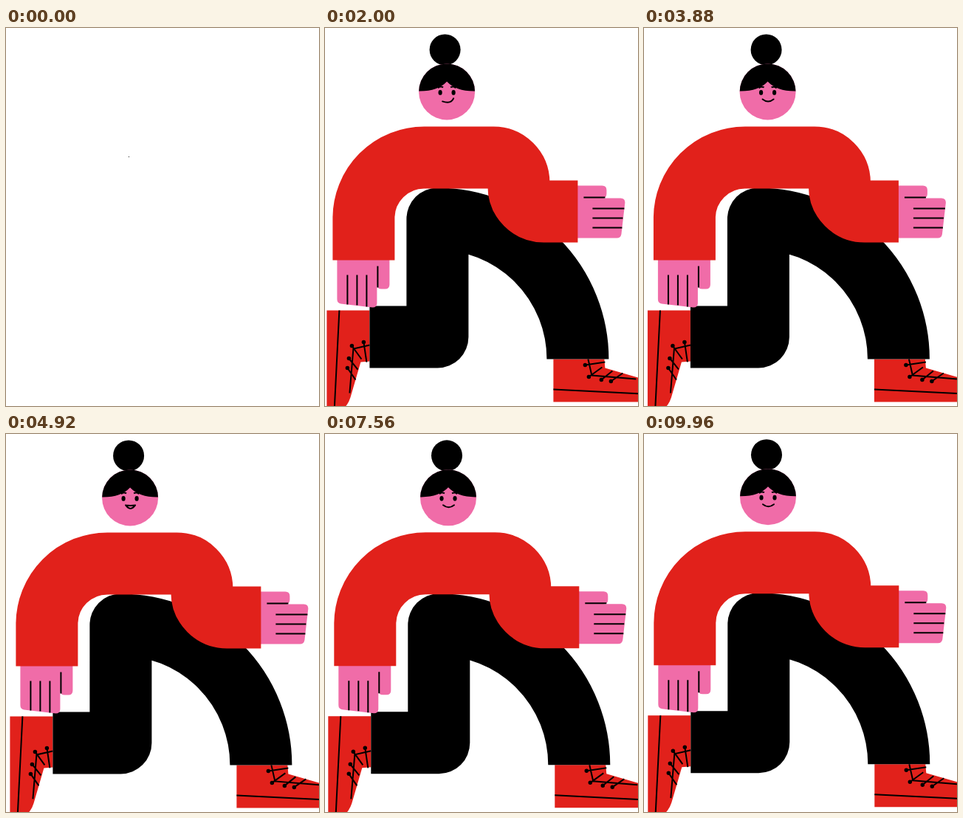
Animation of 424 by 512 pixels, one loop 10000 ms. Source, as an HTML page:

```html
<!DOCTYPE html>
<html lang="en">
<head>
<meta charset="utf-8">
<style>
  html, body { margin: 0; width: 100%; height: 100%; overflow: hidden; background: #fff; }
  svg { display: block; width: 424px; height: 512px; }
  .limb { fill: none; stroke-width: 84; stroke-linejoin: round; }
  .ink { fill: none; stroke: #000; stroke-width: 2; }
</style>
</head>
<body>
<svg viewBox="0 0 424 512">
  <defs>
    <g id="shoe">
      <path fill="#e1211b" d="M0 0H69L70 12L118 26Q140 33 140 58H0Z"/>
      <path class="ink" d="M0 41L140 48M47 0L52 22L112 27M43 8L70 4M48 24L66 11M65 28L80 16M78 30L94 19"/>
      <path stroke="#000" stroke-width="5.5" stroke-linecap="round" d="M43 8h0M48 24h0M65 28h0M78 30h0"/>
    </g>
    <g id="hand">
      <path fill="#f06ca8" d="M-8 0H33Q39 0 39 6V11Q39 17 33 17H58Q64 17 64 23L59 66Q58 71 53 71H-8Z"/>
      <path class="ink" d="M8 16H37M20 31H63M20 44H61M20 57H60"/>
    </g>
    <clipPath id="face"><circle r="38"/></clipPath>
  </defs>
  <circle id="seed" cx="166.5" cy="174.5" r=".6"/>
  <g id="figure">
    <g id="head">
      <circle id="bun" cx="-2" cy="-57" r="21"/>
      <circle r="38" fill="#f06ca8"/>
      <path clip-path="url(#face)" d="M-40 -40H40V-1Q13 0 0 -14Q-13 0 -40 -1Z"/>
      <path class="ink" stroke-width="1.5" d="M-12 -5Q-9 -8 -5 -6M5 -6Q9 -8 12 -5"/>
      <ellipse cx="-9" cy="1" rx="2.6" ry="3.4"/>
      <ellipse cx="9" cy="1" rx="2.6" ry="3.4"/>
      <path id="mouth" class="ink" stroke-linecap="round" stroke-linejoin="round"/>
    </g>
    <use id="backShoe" href="#shoe"/>
    <use id="frontShoe" href="#shoe"/>
    <path id="legs" class="limb" stroke="#000" d="M344 449A190 190 0 0 0 154 259V419H62"/>
    <use id="leftHand" href="#hand"/>
    <use id="rightHand" href="#hand"/>
    <path id="torso" class="limb" stroke="#e1211b"
      d="M54 315V258A82 82 0 0 1 136 176H230A34 34 0 0 1 264 210V215A34 34 0 0 0 298 249H344"/>
  </g>
</svg>
<script>
const LOOP = 10000;
const el = id => document.getElementById(id);
const clamp = v => Math.min(1, Math.max(0, v));
const smooth = v => v * v * (3 - 2 * v);
const span = (t, from, to) => clamp((t - from) / (to - from));
const easeOut = v => 1 - (1 - v) ** 3;
const mix = (a, b, k) => a + (b - a) * k;
const place = (id, transform) => el(id).setAttribute('transform', transform);

// Body drift: time, x, y
const drift = [
  [0, 1, -1], [1160, 0, -1], [1700, -1.6, -.6], [2200, -1.6, -.4], [3000, 0, 0],
  [4100, 1, -.6], [4920, 1.4, -.6], [5900, -.4, -.2], [6480, -.7, -1],
  [7320, 0, -.7], [8640, 3.4, -.5], [9000, 3.6, -.5], [9960, 1.3, -1.8], [LOOP, 1.2, -1.8]
];

// Mouth: time, left x, left y, right x, right y, lower lip, upper lip
const mouths = [
  [0, -6, 13, 9, 9, 17, 17], [3300, -6, 13, 9, 9, 17, 17],
  [3600, -7, 10, 8, 10, 16, 16], [4300, -7, 10, 8, 10, 16, 16],
  [4600, -6, 10, 7, 10, 19, 11], [5300, -6, 10, 7, 10, 19, 11],
  [5600, -7, 10, 8, 10, 16, 16], [LOOP, -7, 10, 8, 10, 16, 16]
];

function sample(keys, t) {
  const i = keys.findIndex(k => k[0] > t);
  const a = keys[i - 1], b = keys[i];
  const k = smooth(span(t, a[0], b[0]));
  return a.slice(1).map((v, j) => mix(v, b[j + 1], k));
}

// Reveals a stroke outwards from its middle
function trim(id, k) {
  const path = el(id), length = path.getTotalLength(), shown = length * k;
  path.style.visibility = k > 0 ? 'visible' : 'hidden';
  path.style.strokeDasharray = k < 1 ? `0 ${(length - shown) / 2} ${shown} ${length}` : 'none';
}

// Settles at 1 after a small overshoot
function pop(t, start) {
  if (t <= start) return 0;
  const s = (t - start) / 1000;
  return 1 - Math.exp(-7 * s) * Math.cos(8 * s);
}

function render(t) {
  el('seed').style.display = t < 40 ? '' : 'none';
  el('figure').style.display = t < 40 ? 'none' : '';
  const [dx, dy] = sample(drift, t);
  place('figure', `translate(${dx} ${dy})`);

  trim('torso', easeOut(span(t, 0, 720)));
  trim('legs', easeOut(span(t, 120, 840)));

  const reach = pop(t, 780), step = pop(t, 560);
  const out = -72 * (1 - reach);
  for (const id of ['leftHand', 'rightHand'])
    el(id).style.visibility = t > 780 ? 'visible' : 'hidden';
  place('leftHand', `translate(89 315) rotate(90) translate(${out} 0)`);
  place('rightHand', `translate(344 214) translate(${out} 0)`);
  const stepSize = Math.min(1, step);
  place('backShoe', `translate(62 383) rotate(90) scale(${stepSize})`);
  place('frontShoe', `translate(311 449) scale(${stepSize})`);

  // The head shoots up, then rings down while the bun swings
  const up = easeOut(span(t, 760, 1160));
  const after = Math.max(0, t - 1160) / 1000;
  const lift = 30 * Math.exp(-5 * after) * Math.cos(9 * after);
  const y = t < 1160 ? mix(178, 57, up) : 87 - lift;
  const swing = t < 1160 ? 28 * up : 28 * Math.exp(-4 * after) * Math.cos(10 * after);
  place('head', `translate(166.7 ${y}) scale(${easeOut(span(t, 600, 900))})`);
  place('bun', `rotate(${swing})`);

  const [lx, ly, rx, ry, low, high] = sample(mouths, t);
  const mid = (lx + rx) / 2 + (ly - ry);
  el('mouth').setAttribute('d', `M${lx} ${ly}Q${mid} ${low} ${rx} ${ry}Q${mid} ${high} ${lx} ${ly}`);
}

function tick() {
  render(performance.now() % LOOP);
  requestAnimationFrame(tick);
}
tick();
</script>
</body>
</html>
```
